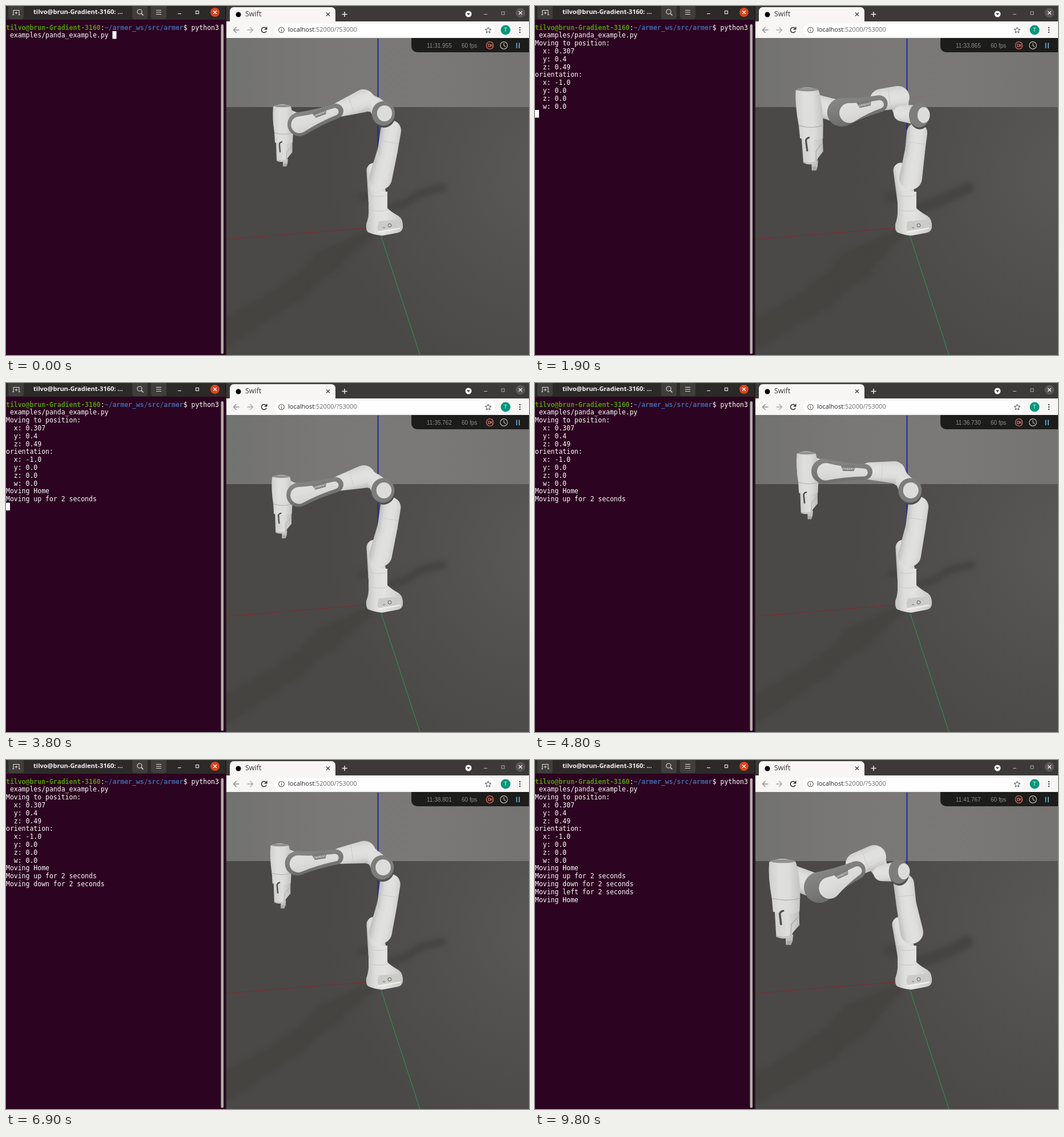
An HTML page with a canvas that plays this animation: 916 by 611 pixels, repeating every 9900 ms.

```html
<!DOCTYPE html>
<html lang="en">
<head>
<meta charset="utf-8">
<title>Robot arm demo</title>
<style>
html, body { margin: 0; width: 100%; height: 100%; overflow: hidden; background: #2c0320; }
canvas { display: block; }
</style>
</head>
<body>
<canvas id="stage" width="916" height="611"></canvas>
<script>
const ctx = document.getElementById('stage').getContext('2d');
const LOOP = 9900, STEP = 100;
const MONO = '"DejaVu Sans Mono", monospace', UI = '"Open Sans", sans-serif', ARIAL = '"Liberation Sans", sans-serif';
const mix = (a, b, u) => a + (b - a) * u;
const mixPose = (p, q, u) => p.map((v, i) => mix(v, q[i], u));

// Pose: head x y sx sy skew | casing A x y r, B x y r, turn | upper arm body x y r, x y r
//       | elbow x y | joint x y | yaw | shoulder top x y | shoulder bottom x | column top x
const home = [484, 172, 1, 1, 0, 514, 207, 21, 578, 184, 13, 0, 584, 181, 13, 626, 166, 20, 647, 173, 661, 188, 2, 674, 218, 656, 645];
const reach = [477, 142, 1.3, 1.34, .06, 537, 186, 25, 603, 171, 15, 14, 606, 164, 19, 636, 160, 20, 642, 188, 673, 191, 8, 669, 222, 658, 641];
const raised = [472, 96, 1.1, 1.13, .01, 502, 131, 22, 577, 143, 14, 5, 587, 142, 16, 631, 152, 19, 645, 172, 655, 188, 1, 670, 216, 656, 645];
const left = [468, 174, 1.2, 1.16, .02, 516, 215, 24, 582, 187, 14, 4, 588, 179, 16, 621, 165, 20, 639, 189, 661, 189, 6, 667, 221, 657, 643];
const farLeft = [434, 173, 1.5, 1.38, .035, 498, 223, 27, 563, 193, 16, 18, 564, 182, 20, 594, 170, 21, 607, 198, 637, 195, 9, 646, 217, 660, 639];
const moves = [[0, home], [1200, home], [1950, reach], [2150, reach], [3050, home], [3530, home],
  [5530, mixPose(home, raised, 1.09)], [7530, home], [8400, left], [9530, farLeft], [LOOP, farLeft]];
const clockKeys = [[0, 31.955], [1900, 33.865], [3800, 35.762], [5700, 37.601], [6900, 38.801], [8400, 40.238], [9800, 41.767]];
const output = [
  [1200, 'Moving to position:', '  x: 0.307', '  y: 0.4', '  z: 0.49', 'orientation:', '  x: -1.0', '  y: 0.0', '  z: 0.0', '  w: 0.0'],
  [2200, 'Moving Home'], [3530, 'Moving up for 2 seconds'], [5530, 'Moving down for 2 seconds'],
  [7530, 'Moving left for 2 seconds'], [9530, 'Moving Home']];

function segment(keys, t) {
  let i = 0;
  while (i < keys.length - 2 && t >= keys[i + 1][0]) i++;
  const [[t0, a], [t1, b]] = [keys[i], keys[i + 1]];
  return [a, b, (t - t0) / (t1 - t0)];
}

function rect(x, y, w, h, color, radius = 0) {
  ctx.fillStyle = color;
  ctx.beginPath();
  ctx.roundRect(x, y, w, h, radius);
  ctx.fill();
}
function disc(x, y, rx, color, ry = rx) {
  ctx.fillStyle = color;
  ctx.beginPath();
  ctx.ellipse(x, y, rx, ry, 0, 0, 7);
  ctx.fill();
}
function ring(x, y, r, color, from = 0, to = 7, width = 1.2) {
  ctx.strokeStyle = color;
  ctx.lineWidth = width;
  ctx.beginPath();
  ctx.arc(x, y, r, from, to);
  ctx.stroke();
}
function stroke(path, color, width = 1.2) {
  ctx.strokeStyle = color;
  ctx.lineWidth = width;
  ctx.stroke(new Path2D(path));
}
function shape(path, fill) {
  ctx.fillStyle = fill;
  ctx.fill(new Path2D(path));
}
function text(str, x, y, font, color, align = 'left', base = 'middle') {
  ctx.font = font;
  ctx.fillStyle = color;
  ctx.textAlign = align;
  ctx.textBaseline = base;
  ctx.fillText(str, x, y);
}
function gradient(x0, y0, x1, y1, ...colors) {
  const g = ctx.createLinearGradient(x0, y0, x1, y1);
  colors.forEach((c, i) => g.addColorStop(i / (colors.length - 1), c));
  return g;
}
const cross = (x, y, r, color) => stroke(`M${x - r} ${y - r}l${2 * r} ${2 * r}m0 ${-2 * r}l${-2 * r} ${2 * r}`, color, 1.4);

const WHITE = ['#cfcfcd', '#dededc', '#e1e1df', '#dadad8', '#bcbcb9'];
const DARK = ['#868684', '#7b7b79', '#6c6c6a'];

// Hull of two circles, shaded across its axis; pinch draws its sides inward
function capsule(x1, y1, r1, x2, y2, r2, colors = WHITE, pinch = 0) {
  const dx = x2 - x1, dy = y2 - y1, a = Math.atan2(dy, dx);
  const o = Math.acos(Math.max(-1, Math.min(1, (r1 - r2) / Math.hypot(dx, dy))));
  const r = Math.max(r1, r2), mx = (x1 + x2) / 2, my = (y1 + y2) / 2;
  const nx = Math.sin(a) * r, ny = -Math.cos(a) * r;
  const side = (angle, x, y) => {
    const reach = (r1 + r2) / 2 - 2 * pinch;
    ctx.quadraticCurveTo(mx + Math.cos(angle) * reach, my + Math.sin(angle) * reach, x, y);
  };
  ctx.beginPath();
  ctx.arc(x1, y1, r1, a + o, a - o + 2 * Math.PI);
  side(a - o, x2 + r2 * Math.cos(a - o), y2 + r2 * Math.sin(a - o));
  ctx.arc(x2, y2, r2, a - o, a + o);
  side(a + o, x1 + r1 * Math.cos(a + o), y1 + r1 * Math.sin(a + o));
  ctx.fillStyle = gradient(mx + nx, my + ny, mx - nx, my - ny, ...colors);
  ctx.fill();
}
function seam(x1, y1, x2, y2, u, half) {
  const a = Math.atan2(y2 - y1, x2 - x1), x = mix(x1, x2, u), y = mix(y1, y2, u);
  const nx = Math.sin(a) * half, ny = -Math.cos(a) * half;
  stroke(`M${x - nx} ${y - ny}L${x + nx} ${y + ny}`, '#c6c6c3', .8);
}

function drawShadows(yaw) {
  const s = yaw - 2, tone = ['#454441', '#454441'];
  ctx.filter = 'blur(4px)';
  capsule(640, 396, 8, 562, 447 + s, 20 + s, tone);
  capsule(560, 448 + s, 21 + s, 505, 498 + s, 18 + s, tone);
  capsule(505, 498 + s, 18 + s, 385, 572 + s, 24, tone);
  ctx.lineCap = ctx.lineJoin = 'round';
  stroke(`M622 334H640M675 352L700 345L${725 + s} ${328 + s / 2}L${764 - s} 318`, '#454442', 14 + s);
  ctx.filter = 'none';
  ctx.lineCap = 'butt';
}

function drawBase(columnX) {
  capsule(columnX, 288, 13.5, 651, 340, 16.5);
  shape('M635 325H668V354Q674 360 688 368Q696 374 695 388Q694 395 686 397L659 402Q645 401 634 396Q630 392 631 382Q636 368 635 356Z',
    gradient(631, 0, 695, 0, '#c3c3c0', '#dededc', '#e3e3e1', '#d6d6d4', '#c6c6c3'));
  stroke('M635 331Q651 336 668 331M635 356Q651 362 668 357', '#c6c6c3', .8);
  shape('M653 377L687 374Q691 376 690 387L652 394Q649 387 653 377Z', '#cbcbc8');
  stroke('M651 396L691 389', '#f0f0ee', 2);
  ring(672, 384, 3, '#555', 0, 7, .9);
  stroke('M660 388h4', '#666', 1);
}

function drawHead(x, y, sx, sy, skew) {
  ctx.save();
  ctx.transform(sx, 0, skew, sy, x, y);
  const shade = gradient(-17, 0, 19, 0, '#cfcfcd', '#dfdfdd', '#dcdcda', '#c4c4c1');
  shape('M1 96H10L9 104L7 109L1 109Z', '#c0c0bd');
  shape('M2 104H8L7 109H2Z', '#a9a9a6');
  shape('M-11 67H17.5V84L10 93L7 99Q-2 103 -10 99Z', gradient(-10, 0, 17, 0, '#cfcfcc', '#dededc', '#bdbdba'));
  stroke('M7 98L8 83L16 74M-10 98Q-2 101 6 98', '#a4a4a1', .8);
  shape('M-14 49H19L18 67Q2 72 -13 67Z', shade);
  shape('M-16 4Q0 -4 15 4Q20 22 19 50Q3 55 -14 50Q-18 24 -16 4Z', shade);
  stroke('M-14 50Q3 55 19 50', '#a9a9a6', .9);
  disc(0, 3, 14.5, '#92928f', 2.3);
  ctx.lineCap = 'round';
  stroke('M-1 66Q-6 67 -5 72L-4 83', '#50504e', 2.4);
  ctx.lineCap = 'butt';
  ctx.restore();
}

function drawRobot(p) {
  const [hx, hy, sx, sy, skew, ax, ay, ar, bx, by, br, turn, ux, uy, ur, vx, vy, vr,
    ex, ey, jx, jy, yaw, tx, ty, sbx, cx] = p;
  drawShadows(yaw);
  stroke('M386 408.5L640 388', '#84282d', 1);
  stroke('M655 397L725 611', '#2a9a48', 1);
  stroke('M651.5 57V390', '#1f1fa6', 1.8);

  drawBase(cx);
  const bendX = mix(tx, sbx, .3), bendY = 252;
  capsule(bendX, bendY, 17.5, sbx, 301.5, 20);
  capsule(tx, ty, 18, bendX, bendY, 17.5);
  seam(tx, ty, bendX, bendY, .6, 17);
  capsule(vx, vy, vr - 2, ex, ey, 13);
  capsule(ux, uy, ur, vx, vy, vr);
  seam(ux, uy, vx, vy, .5, (ur + vr) / 2 - 1);
  capsule(ex, ey, 14, jx, jy, 18);
  disc(jx + 1, jy + 3, 21 - yaw * .4, '#4e4e4c', 22);
  disc(jx, jy, 21 - yaw * .4, '#7d7d7b', 21.5);
  disc(jx + yaw, jy, 14 - yaw * .4, '#dcdcda', 14);

  capsule(hx + 8 * sx, hy + 22 * sy, 14 * sx, ax, ay, ar * .8);
  drawHead(hx, hy, sx, sy, skew);
  capsule(ax, ay, ar, bx, by, br, DARK, 1.5);
  capsule(ax + turn, ay + 1, ar * .7, bx - 2 + turn * .2, by + 1, br * .5, ['#e0e0de', '#dcdcda', '#d2d2d0'], 1.5);

  ctx.save();
  ctx.translate(mix(ax, bx, .6) + turn * .2, mix(ay, by, .6));
  ctx.rotate(Math.atan2(by - ay, bx - ax));
  shape('M-14 -11H13L9 -1H-10Z', '#7b7b79');
  text('ORBENT', -.5, -4.5, `bold 5px ${ARIAL}`, '#d8d8d6', 'center');
  ctx.restore();
}

function drawScene(t, clock) {
  ctx.save();
  ctx.beginPath();
  ctx.rect(386, 56, 530, 555);
  ctx.clip();
  rect(386, 56, 530, 121, gradient(386, 0, 916, 0, '#727271', '#797877', '#7a7978', '#747372'));
  const floor = ctx.createRadialGradient(940, 290, 20, 940, 290, 380);
  floor.addColorStop(0, '#595857');
  floor.addColorStop(.5, '#51504f');
  floor.addColorStop(1, '#4a4948');
  rect(386, 177, 530, 434, floor);

  const [from, to, u] = segment(moves, t);
  drawRobot(mixPose(from, to, t < 3530 ? u * u * (3 - 2 * u) : u));
  rect(710, 47, 220, 34, '#1c1c1a', 10);
  ctx.restore();

  text('11:' + clock.toFixed(3), 737, 70, `10px ${ARIAL}`, '#8d8d8a');
  text('60 fps', 798, 70, `10px ${ARIAL}`, '#8d8d8a');
  ring(847.5, 69, 6.3, '#d4705f');
  ctx.strokeRect(844.5, 67, 4, 4);
  stroke('M849 69l2.5-2v4z', '#d4705f', 1);
  ring(872, 69, 6.3, '#bdb9b2');
  stroke('M872 65v4l3 2.5', '#bdb9b2');
  stroke('M894.5 64.5v9.5M899 64.5v9.5', '#5fa9cf', 1.8);
}

function drawBrowser() {
  rect(386, 0, 530, 28, '#3c3a38');
  rect(392, 2, 185, 34, '#f7f6f5', 7);
  rect(386, 27, 530, 29, '#f7f6f5');
  rect(470, 31, 386, 22, '#fff', 11);
  disc(407, 15, 4.5, '#000');
  text('Swift', 419, 15, `12.5px ${UI}`, '#333');
  cross(564, 14.5, 3, '#444');
  stroke('M588.5 14.5h9M593 10v9', '#eee', 1.5);
  disc(810, 14, 5.5, '#f4f4f4');
  shape('M807 12.5h6l-3 3.5z', '#3c3a38');
  stroke('M837 14.5h6', '#bbb', 1);
  ctx.strokeStyle = '#aaa';
  ctx.strokeRect(868, 10, 5, 5);
  disc(901, 12, 8.5, '#595755');
  cross(901, 12, 2.8, '#eee');
  stroke('M408.5 42h-10m5-5l-5 5l5 5', '#8f8f8f', 1.4);
  stroke('M422.5 42h10m-5-5l5 5l-5 5', '#ababab', 1.4);
  ring(452, 42, 4.5, '#333', .4, 5.3, 1.6);
  shape('M457.5 36v5.5h-5.5z', '#333');
  ring(482.5, 42, 4.8, '#555', 0, 7, 1.1);
  stroke('M482.5 41.5v3.2M482.5 39.2v1.2', '#555', 1.2);
  text('localhost', 494, 42, `11px ${UI}`, '#222');
  const hostWidth = ctx.measureText('localhost').width;
  text(':52000/?53000', 494 + hostWidth, 42, `11px ${UI}`, '#666');
  stroke('M844.5 37l1.5 3.5l3.8.3l-2.9 2.5l.9 3.7l-3.3-2l-3.3 2l.9-3.7l-2.9-2.5l3.8-.3z', '#444', 1);
  disc(875, 42, 8.5, '#07967c');
  text('T', 875, 42.5, `9.5px ${UI}`, '#fff', 'center');
  for (const y of [38, 42, 46]) disc(900, y, 1.2, '#444');
}

function drawTerminal(t, clock) {
  rect(0, 0, 386, 611, '#2c0320');
  rect(0, 0, 386, 24, '#2c2a28');
  rect(384, 0, 2, 611, '#201d1d');
  for (const x of [4, 221, 254]) rect(x, -4, 27, 27, '#403e3b', 4);
  stroke('M13 15.5V7.5H23V15.5M11 15.5h3m8 0h3M18 9.5v5m-2.5-2.5h5', '#ddd', 1.1);
  text('tilvo@brun-Gradient-3160: ...', 48, 11.5, `bold 11px ${UI}`, '#f4f2f0');
  ring(234, 10, 4, '#ddd');
  stroke('M237 13l3.5 3.5', '#ddd', 1.5);
  stroke('M263 7.5h9M263 11h9M263 14.5h9', '#ddd');
  stroke('M301 13.5h6', '#ddd');
  ctx.strokeRect(332.5, 8.5, 5, 5);
  disc(366, 11, 8, '#dd4420');
  cross(366, 11, 2.8, '#fff');
  rect(376.5, 32, 4.5, 577, '#b5afac', 2);

  const size = 11.48, pitch = 13.8, regular = `${size}px ${MONO}`, bold = `bold ${regular}`;
  let x = 0;
  const write = (str, font, color) => {
    text(str, x, 41.5, font, color, 'left', 'alphabetic');
    x += ctx.measureText(str).width;
  };
  write('tilvo@brun-Gradient-3160', bold, '#4e9a06');
  write(':', regular, '#fff');
  write('~/armer_ws/src/armer', bold, '#3d68a8');
  write('$ python3', regular, '#fff');

  const lines = [' examples/panda_example.py '];
  for (const [at, ...block] of output) if (t >= at) lines.push(...block);
  lines.forEach((line, i) => text(line, 0, 41.5 + pitch * (i + 1), regular, '#fff', 'left', 'alphabetic'));

  const entered = t >= 200, sinceEnter = (clock - 31.955) * 1000 - 180;
  if (!entered) rect(ctx.measureText(lines[0]).width, 44, 7, 13.5, '#fff');
  else if (sinceEnter % 1205 < 600) rect(0, 44 + pitch * lines.length, 7, 13.5, '#fff');
}

function frame(now) {
  const t = Math.floor((now % LOOP) / STEP) * STEP;
  const clock = mix(...segment(clockKeys, t));
  drawScene(t, clock);
  drawBrowser();
  drawTerminal(t, clock);
  requestAnimationFrame(frame);
}
requestAnimationFrame(frame);
</script>
</body>
</html>
```
